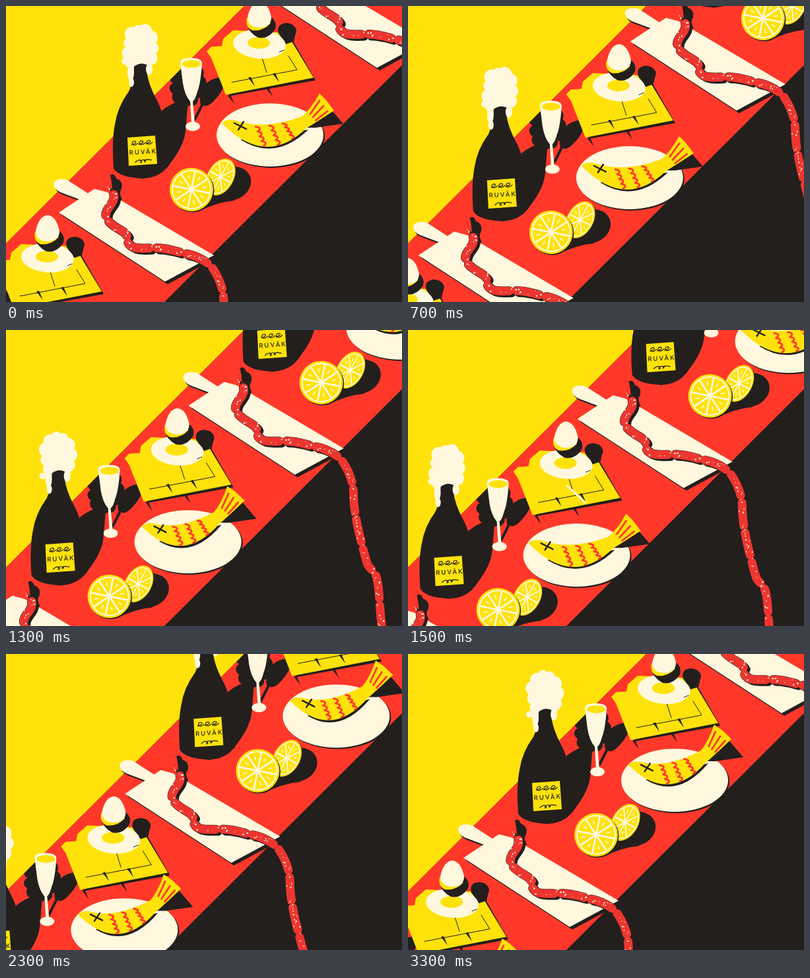
An HTML page with a canvas for the animation above (3400 ms loop, 600 by 450 pixels).

```html
<!DOCTYPE html>
<html lang="en">
<head>
<meta charset="utf-8">
<title>Endless picnic table</title>
<style>
html, body { margin: 0; width: 100%; height: 100%; overflow: hidden; background: #231f1d; }
canvas { display: block; }
</style>
</head>
<body>
<canvas id="stage" width="600" height="450"></canvas>
<script>
const ctx = document.getElementById('stage').getContext('2d');
const YELLOW = '#ffe20a', RED = '#ff382a', BLACK = '#231f1d', CREAM = '#fff8de', MEAT = '#ee352f';
const LOOP = 3400, FRAMES = 80, STEP_X = 321, STEP_Y = -325;
const CLOTH = new Path2D('M361,0 L690,0 L240,450 L-89,450Z');

function fill(color, d) {
  ctx.fillStyle = color;
  ctx.fill(new Path2D(d));
}
function line(color, width, d) {
  ctx.strokeStyle = color;
  ctx.lineWidth = width;
  ctx.lineCap = ctx.lineJoin = 'round';
  ctx.stroke(new Path2D(d));
}
function oval(color, x, y, rx, ry = rx, turn = 0) {
  ctx.fillStyle = color;
  ctx.beginPath();
  ctx.ellipse(x, y, rx, ry, turn, 0, 7);
  ctx.fill();
}
function placed(x, y, turn, paint) {
  ctx.save();
  ctx.translate(x, y);
  ctx.rotate(turn);
  paint();
  ctx.restore();
}
function quad(a, c, b, t) {
  const u = 1 - t;
  return [0, 1].map(i => u * u * a[i] + 2 * u * t * c[i] + t * t * b[i]);
}
function seeded(seed) {
  return () => (seed = seed * 16807 % 2147483647) / 2147483647;
}

// A cloud: an oval core with a ring of uneven puffs
function cloud(color, x, y, seed) {
  const rand = seeded(seed * 7919 + 1234567), puffs = 11;
  oval(color, x, y, 19, 29);
  for (let i = 0; i < puffs; i++) {
    const a = i * 2 * Math.PI / puffs;
    oval(color, x + 18 * Math.cos(a), y + 28 * Math.sin(a), 6 + 6 * rand());
  }
}

// Shadows that fall on the cloth only
function shadows() {
  fill(BLACK, 'M205,263 Q240,256 249,239 Q270,212 272,190 L275,154 Q272,140 260,146 Q250,148 236,159 L225,220Z');
  cloud(BLACK, 274, 117, 5);
  fill(BLACK, 'M297,128 Q305,108 333,108 Q331,128 317,142 Q306,155 299,151 L289,171 L285,177 L284,172 L295,150 Q292,140 297,128Z');
}

function bottle(beat) {
  cloud(CREAM, 203, 64, beat + 1);
  oval(CREAM, 180, 84 + 4 * beat, 5);
  fill(BLACK, 'M194,92 Q204,84 215,90 L213,99 Q216,120 228,142 Q241,166 242,200 L241,249 Q226,263 203,262 Q171,260 163,247 Q160,205 165,180 Q169,153 186,130 Q193,116 194,92Z');
  oval(CREAM, 189, 101, 5, 13);
  oval(CREAM, 190, 116, 4, 7);
  oval(CREAM, 217, 96, 5, 9);
  fill(YELLOW, 'M184,200 L226,197 L229,240 L186,243Z');
  placed(207, 224, -0.06, () => {
    for (const x of [-16, -5, 6]) line(BLACK, 1.2, `M${x},-14 q9,-2 6,-5 q-5,-1 -5,4 q3,4 9,-1`);
    line(BLACK, 1.2, 'M-12,13 q6,-5 9,-2 q2,3 -1,3 q-1,-5 6,-4 q4,2 0,3 q0,-5 11,-2');
    ctx.fillStyle = BLACK;
    ctx.font = '500 9.5px Inter, "Open Sans", sans-serif';
    ctx.letterSpacing = '2px';
    ctx.textAlign = 'center';
    ctx.fillText('RUVÄK', 1, 1);
  });
}

function glass() {
  fill(CREAM, 'M264,86 Q264,79 280,79 Q297,79 297,87 Q295,118 290,130 Q287,142 283,145 L286,178 L281,178 L279,145 Q271,136 268,118Z');
  oval(CREAM, 283, 183, 11, 7);
  oval(YELLOW, 281, 88, 14, 6);
}

function breadAndEgg(crumb) {
  fill(BLACK, 'M340,130 L338,137 L469,113 L432,48 L420,40Z');
  fill(YELLOW, 'M304,69 L311,62 L327,61 L329,50 L344,37 L412,40 L433,54 L466,109 L333,135 L311,79Z');
  oval(BLACK, 426, 37, 14, 11, 0.2);
  fill(BLACK, 'M412,40 L439,40 L436,54 L424,58Z');
  line(BLACK, 1, 'M342,116 L441,97 L428,76 M388,79 L395,101');
  for (const [x, y] of [[367, 109], [404, 103], [336, 136], [394, 125]]) fill(BLACK, `M${x},${y} l4,-1 l6,14Z`);
  if (crumb) line(CREAM, 3, 'M386,91 L413,116');

  oval(CREAM, 384, 58, 40, 22, 0.08);
  oval(YELLOW, 383, 56, 17, 9);
  line(BLACK, 1, 'M414,70 l7,-3');
  fill(BLACK, 'M365,27 Q390,34 402,17 Q411,24 408,35 Q398,51 382,48 Q368,41 365,27Z');
  fill(YELLOW, 'M365,18 Q362,32 373,37 Q390,39 401,26Z');
  fill(CREAM, 'M384,-7 Q397,-6 402,17 Q402,32 384,33 Q366,32 366,17 Q371,-6 384,-7Z');
}

// The tail rises over four beats while the head dips and comes back
function fish(beat) {
  const a = beat * Math.PI / 2, lift = Math.sin(beat * Math.PI / 6);
  const dip = 9 * Math.sin(a) + 3.5 * (1 - Math.cos(a));
  const nx = 327 - dip / 2, ny = 178 + dip;
  const rx = 452 - 7 * lift, ry = 177 - 18 * lift;
  const midX = (nx + rx) / 2 + 4, midY = (ny + ry) / 2;
  const nose = [nx, ny], upper = [rx - 4, ry - 9], lower = [rx + 4, ry + 8];
  const back = [midX, midY + 11], belly = [midX, midY + 69];

  oval(BLACK, 402, 198, 81, 48);
  oval(CREAM, 400, 196, 81, 48);
  fill(BLACK, 'M459,235 L463,229 L470,230 L466,238Z');
  fill(BLACK, `M${rx + 36},${ry - 25} l23,27 l-42,6 l-22,0Z`);
  placed(2, 3, 0, () => fill(BLACK, `M${quad(nose, belly, lower, 0.2)} Q${midX + 12},${midY + 56} ${lower}Z`));
  fill(YELLOW, `M${nose} Q${nx + 8},${ny - 8} ${nx + 24},${ny - 3} Q${back} ${upper} L${lower} Q${belly} ${nose}Z`);

  const bumps = 4;
  for (const t of [0.4, 0.57, 0.74]) {
    const top = quad(nose, back, upper, t), end = quad(nose, belly, lower, t + 0.08);
    const dx = (end[0] - top[0]) / bumps, dy = (end[1] - top[1] - 3) / bumps;
    line(RED, 2.8, `M${top[0]},${top[1] + 2}` + ` q11,${dy * 0.3} ${dx},${dy}`.repeat(bumps));
  }

  placed(rx, ry, -0.18 * lift, () => {
    fill(YELLOW, 'M-6,-7 Q10,-20 23,-44 L33,-34 L45,-18 Q24,-4 3,9Z');
    for (const t of [0, 1, 2]) line(RED, 2.8, `M${9 + 4 * t},${-13 + 5 * t} L${23 + 6 * t},${-33 + 8 * t}`);
  });
  placed(nx + 28, ny + 4, 0, () => line(BLACK, 2.4, 'M-9,-4 L9,5 M5,-6 L-3,6'));
}

function slice(x, y, rx, ry, turn) {
  oval(BLACK, x + 1.5, y + 1.5, rx, ry, turn);
  oval(YELLOW, x, y, rx, ry, turn);
  placed(x, y, turn, () => {
    ctx.scale(rx / 33, ry / 33);
    ctx.strokeStyle = CREAM;
    ctx.lineWidth = 2;
    ctx.beginPath();
    ctx.arc(0, 0, 29, 0, 7);
    ctx.stroke();
    for (let i = 0; i < 8; i++) {
      line(CREAM, 2.8, 'M0,0 L27,0');
      ctx.rotate(Math.PI / 8);
      line(CREAM, 1.8, 'M17,0 L22,0');
      ctx.rotate(Math.PI / 8);
    }
  });
}

function lemons() {
  oval(BLACK, 342, 270, 30, 25, -0.4);
  fill(BLACK, 'M290,313 Q320,298 345,296 L365,280 L320,260Z');
  slice(325, 260, 20, 30, 0.5);
  slice(281, 279, 33, 33, 0.2);
}

// One path carries the whole chain; dashes cut it into links
const LINK = 46, GAP = 11;
const CHAIN = 'M158,278 C178,300 138,308 156,328 C168,341 186,342 184,356 C186,372 208,368 228,368'
  + ' S262,375 274,377 S306,388 314,400 S330,430 330,450 S336,500 344,530 S350,556 360,566'
  + ' S368,610 372,642 S375,690 376,740';

function makeSpecks() {
  const path = document.createElementNS('http://www.w3.org/2000/svg', 'path');
  path.setAttribute('d', CHAIN);
  const rand = seeded(77), length = path.getTotalLength();
  return Array.from({ length: 120 }, () => {
    const { x, y } = path.getPointAtLength(rand() * length);
    return [x + rand() * 10 - 5, y + rand() * 10 - 5, 0.6 + rand() * 0.7];
  });
}
const specks = makeSpecks();

function boardAndSausage() {
  const handle = 'M72,269 Q76,261 92,264 L129,288 L119,297 L82,283 Q71,278 72,269Z';
  placed(2, 3, 0, () => fill(BLACK, handle));
  placed(4, 4, 0, () => fill(BLACK, 'M80,314 L153,283 L315,379 L241,419Z'));
  fill(CREAM, handle);
  fill(CREAM, 'M80,314 L134,278 L153,283 L315,379 L241,419Z');

  fill(BLACK, 'M158,257 Q164,253 167,262 Q178,266 175,278 Q170,284 176,294 L163,300 L160,268Z');
  line(MEAT, 3, 'M152,256 l3,2 M155,268 l3,5');
  line(BLACK, 3, CHAIN);
  ctx.setLineDash([LINK - GAP, GAP]);
  ctx.lineDashOffset = -10;
  placed(4, 3, 0, () => line(BLACK, 13, CHAIN));
  line(BLACK, 14, CHAIN);
  line(MEAT, 13, CHAIN);
  ctx.setLineDash([]);
  for (const speck of specks) oval(CREAM, ...speck);
}

function eachCopy(shift, paint) {
  for (let k = 2; k >= -1; k--) placed(STEP_X * (k - shift), STEP_Y * (k - shift), 0, paint);
}

function draw(now) {
  // 24 drawings a second, shown every 100 ms
  const tick = Math.floor(now % LOOP / 100);
  const n = Math.floor(tick * 12 / 5);
  const shift = n / FRAMES, beat = n % 4;

  fill(BLACK, 'M0,0H600V450H0Z');
  fill(YELLOW, 'M0,0H361L0,361Z');
  ctx.fillStyle = RED;
  ctx.fill(CLOTH);

  ctx.save();
  ctx.clip(CLOTH);
  eachCopy(shift, shadows);
  ctx.restore();

  eachCopy(shift, () => {
    breadAndEgg(n === 36);
    glass();
    bottle(beat);
    fish(beat);
    lemons();
    boardAndSausage();
  });
  requestAnimationFrame(draw);
}
requestAnimationFrame(draw);
</script>
</body>
</html>
```
